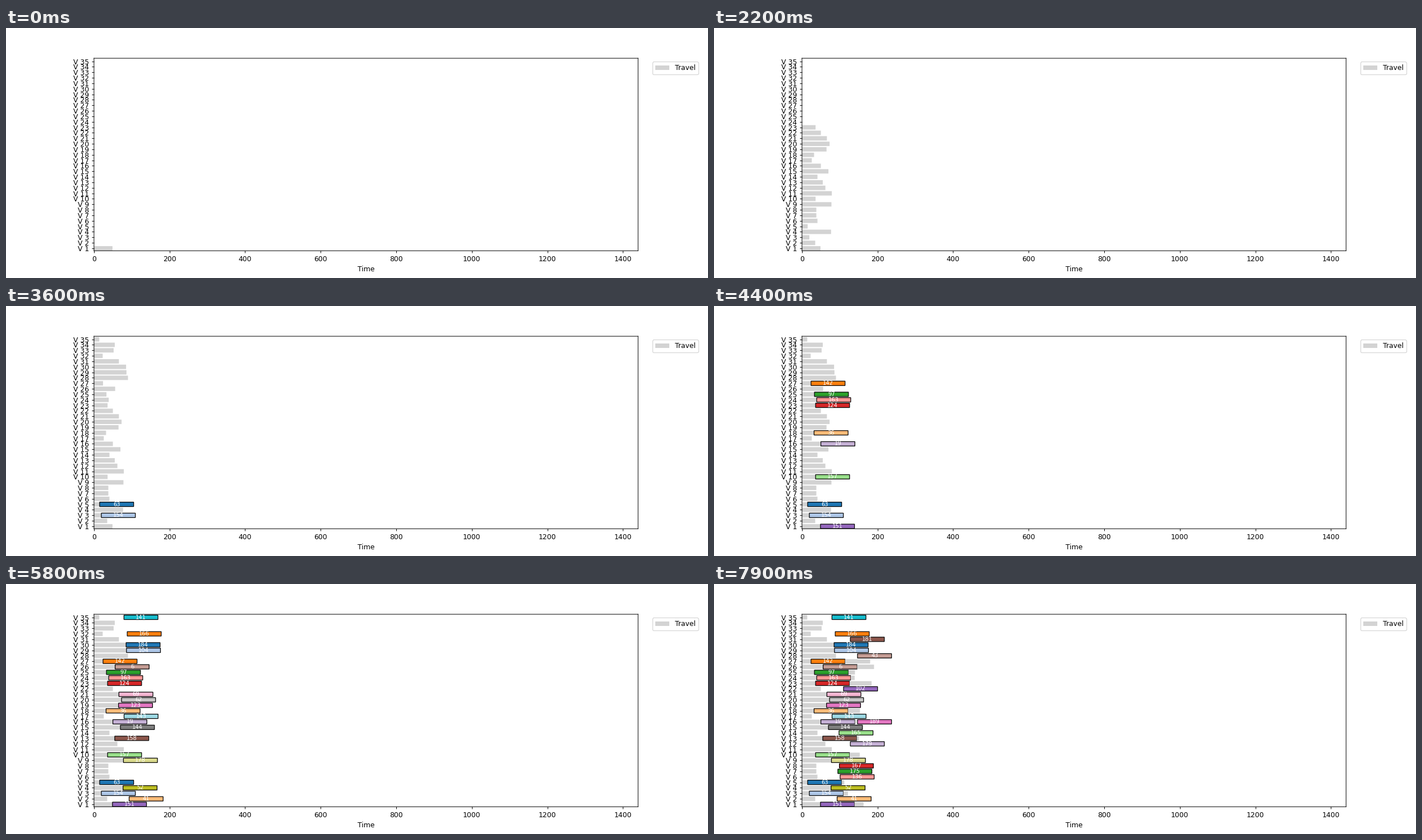
Recreate the animation shown at these times as a matplotlib script. Size 1252 by 447 pixels, loop 8 s.

```python
import math
import random

import matplotlib.pyplot as plt
from matplotlib.animation import FuncAnimation

W, H = 1252, 447
DPI = W / 14
STEP = 100              # ms per event
EVENTS = 80
SERVICE = 90            # length of one job
LEFT, RIGHT, TOP, BOTTOM = 156.9, 1127.25, 54.1, 398.3

# length of each vehicle's first trip, from time 0
TRIPS = [49, 35, 19.5, 77, 15, 41, 38, 38, 78, 36, 79, 62, 55, 41, 70, 50, 26,
         32, 65, 73, 66, 50, 36, 39, 33, 56, 24, 90, 86, 85, 66, 23, 52, 55, 14]
# vehicles with a job booked at a fixed time; the rest start on arrival
BOOKED = {35: 79.3, 17: 79.6, 32: 88, 2: 93, 7: 95, 14: 98, 8: 99, 6: 101,
          22: 110, 12: 128, 31: 128, 28: 147, 16: 147}
SPARE = {11, 33, 34}


def schedule():
    """Events in order of start: (start, end, vehicle, is_job)."""
    rng = random.Random(7)
    trips = [(0, end, v, False) for v, end in enumerate(TRIPS, 1)]
    later = [(t, t + SERVICE, v, True) for v, t in BOOKED.items()]
    for _, arrive, v, _ in trips:
        done = arrive + SERVICE
        booked = BOOKED.get(v, math.inf)
        # an early job must be over before the booked one
        if v not in SPARE and done < booked:
            back = min(done + rng.uniform(2, 70), booked - 3)
            later += [(arrive, done, v, True), (done, back, v, False)]
    return sorted(trips + later, key=lambda e: e[0])[:EVENTS]


fig = plt.figure(figsize=((W + 0.01) / DPI, (H + 0.01) / DPI), dpi=DPI,
                 facecolor="white")
ax = fig.add_axes([LEFT / W, 1 - BOTTOM / H,
                   (RIGHT - LEFT) / W, (BOTTOM - TOP) / H])
for spine in ax.spines.values():
    spine.set_snap(False)

colors = plt.get_cmap("tab20").colors
numbers = random.Random(3).sample(range(3, 191), EVENTS)
steps = []
jobs = 0
for start, end, v, is_job in schedule():
    style = dict(color="lightgray")
    if is_job:
        style = dict(color=colors[jobs % 20], edgecolor="black", linewidth=1)
    artists = list(ax.barh(v, end - start, left=start, height=0.8,
                           snap=False, **style))
    if is_job:
        artists.append(ax.text((start + end) / 2, v, str(numbers[jobs]),
                               color="white", fontsize=8,
                               ha="center", va="center"))
        jobs += 1
    steps.append(artists)

ax.set_xlim(0, 1440)
ax.set_ylim(0.56, 35.56)
ax.set_yticks(range(1, 36), [f"V {v}" for v in range(1, 36)])
ax.set_xlabel("Time")
ax.legend(handles=[plt.Rectangle((0, 0), 1, 1, facecolor="lightgray",
                                 edgecolor="none", label="Travel")],
          bbox_to_anchor=(1.02, 1), loc="upper left")


def draw(frame):
    for i, artists in enumerate(steps):
        for artist in artists:
            artist.set_visible(i <= frame)
    return []


def reset():
    return draw(0)


anim = FuncAnimation(fig, draw, frames=EVENTS, init_func=reset,
                     interval=STEP, repeat=True, repeat_delay=0, blit=False)
plt.show()
```
